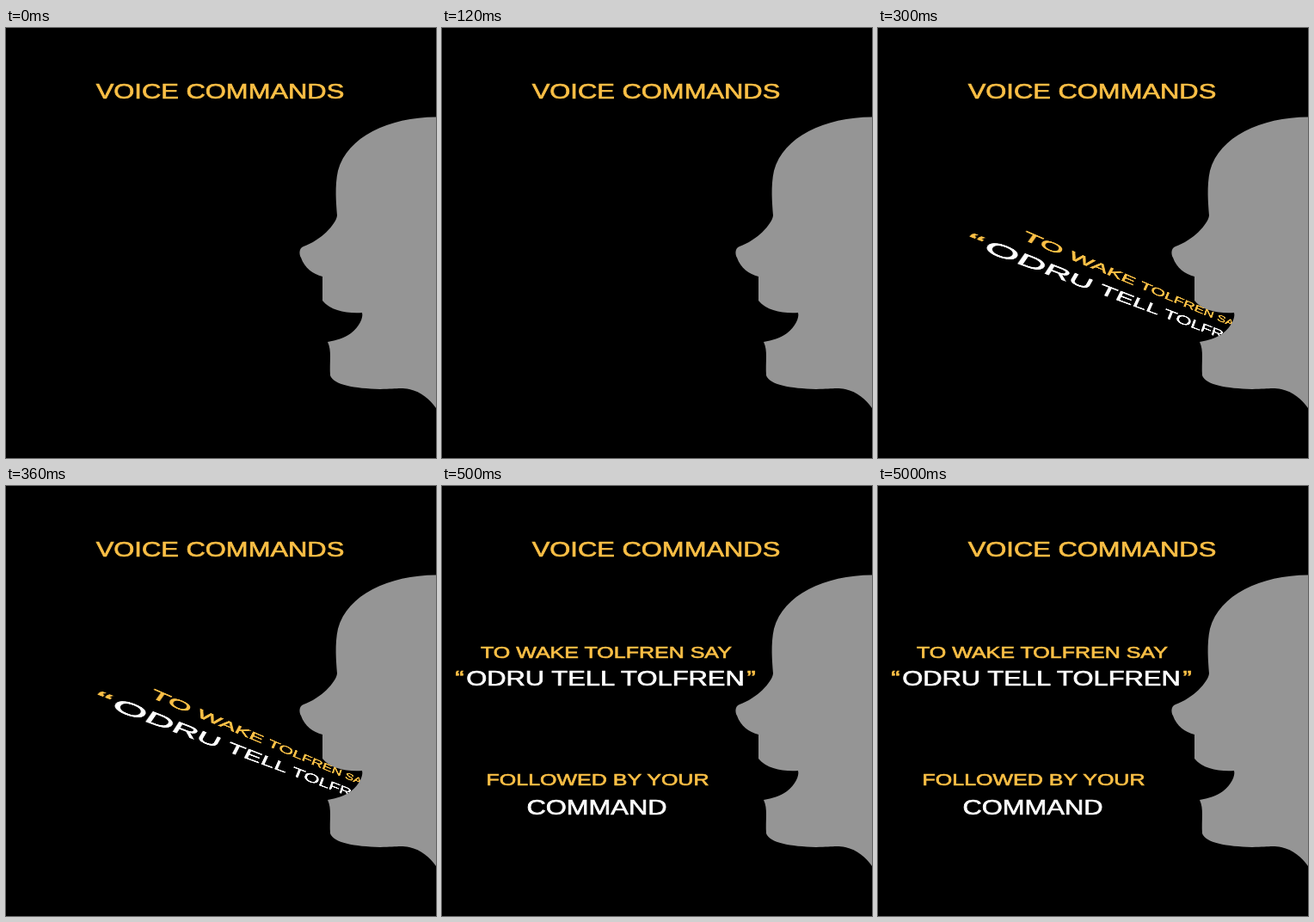
These frames come from a looping animation (500 px wide and 500 px high, 8000 ms). An HTML page:

```html
<!DOCTYPE html>
<html lang="en">
<head>
<meta charset="utf-8">
<title>Voice commands</title>
<style>
  html, body { margin: 0; width: 100%; height: 100%; overflow: hidden; background: #000; }
  #stage { position: relative; width: 500px; height: 500px; overflow: hidden; background: #000; }
  svg { position: absolute; left: 0; top: 0; overflow: visible; }
  .block { width: 1px; height: 1px; transform-origin: 0 0; }
  /* One wide, slightly heavy face for all lettering */
  text {
    font: 23px "Liberation Sans", Arial, sans-serif;
    text-anchor: middle;
    color: #fff;
    transform-box: fill-box;
    transform-origin: center;
    transform: scaleX(1.345);
  }
  text, tspan { fill: currentColor; stroke: currentColor; stroke-width: .6px; }
  .small { font-size: 18.6px; }
  .gold { color: #fcc046; }
</style>
</head>
<body>
<div id="stage">
  <svg class="block" id="wake">
    <text class="small gold" x="191" y="200">TO WAKE TOLFREN SAY</text>
    <text x="190" y="232"><tspan class="gold">“</tspan><tspan dx="2">ODRU TELL TOLFREN</tspan><tspan class="gold" dx="2">”</tspan></text>
  </svg>
  <svg class="block" id="follow">
    <text class="small gold" x="181" y="348">FOLLOWED BY YOUR</text>
    <text x="180" y="382">COMMAND</text>
  </svg>
  <svg width="500" height="500">
    <text class="gold" x="249" y="82">VOICE COMMANDS</text>
    <path fill="#959595" d="M500 103.5C445 104 397 126 386 166C382 184 384 204 385 218
      C384 228 366 247 346 254C340 256 341 264 343 267C347 279 357 286 368 289V317
      C378 329 396 332 414 331C416 337 410 348 401 355C393 361 384 363 374 365
      C379 375 376 388 377 404C381 415 405 419 435 420C452 420 458 418 469 420
      C483 423 493 432 500 442Z"/>
  </svg>
</div>
<script>
const LOOP = 8000;

// Perspective transform taking rect [x, y, w, h] to four corners, clockwise from top left.
function perspective([x, y, w, h], [[x0, y0], [x1, y1], [x2, y2], [x3, y3]]) {
  const ax = x1 - x2, ay = y1 - y2, bx = x3 - x2, by = y3 - y2;
  const sx = x0 - x1 + x2 - x3, sy = y0 - y1 + y2 - y3;
  const det = ax * by - bx * ay;
  const g = (sx * by - sy * bx) / det;
  const k = (ax * sy - ay * sx) / det;
  return new DOMMatrix([
    x1 - x0 + g * x1, y1 - y0 + g * y1, 0, g,
    x3 - x0 + k * x3, y3 - y0 + k * y3, 0, k,
    0, 0, 1, 0,
    x0, y0, 0, 1
  ]).scale(1 / w, 1 / h).translate(-x, -y).toString();
}

const shift = (corners, dx, dy) => corners.map(([x, y]) => [x + dx, y + dy]);

const wakeRect = [44, 193.5, 296, 30.5];
const wakeQuad = [[167.5, 239.5], [423, 348], [418.6, 363.5], [151, 262]];
const followRect = [108.3, 341.5, 74.7, 32];
const followQuad = [[323, 336.7], [398, 332], [393, 358.5], [323, 365.5]];

// Each block: [start time, transform], held until the next start.
const poses = {
  wake: [
    [200, perspective(wakeRect, shift(wakeQuad, 160, 70))],
    [300, perspective(wakeRect, wakeQuad)],
    [400, "none"]
  ],
  follow: [
    [400, perspective(followRect, followQuad)],
    [500, "none"]
  ]
};

function draw() {
  const time = performance.now() % LOOP;
  for (const [id, steps] of Object.entries(poses)) {
    const pose = steps.filter(([start]) => start <= time).pop();
    const { style } = document.getElementById(id);
    style.visibility = pose ? "visible" : "hidden";
    style.transform = pose ? pose[1] : "none";
  }
  requestAnimationFrame(draw);
}
draw();
</script>
</body>
</html>
```
